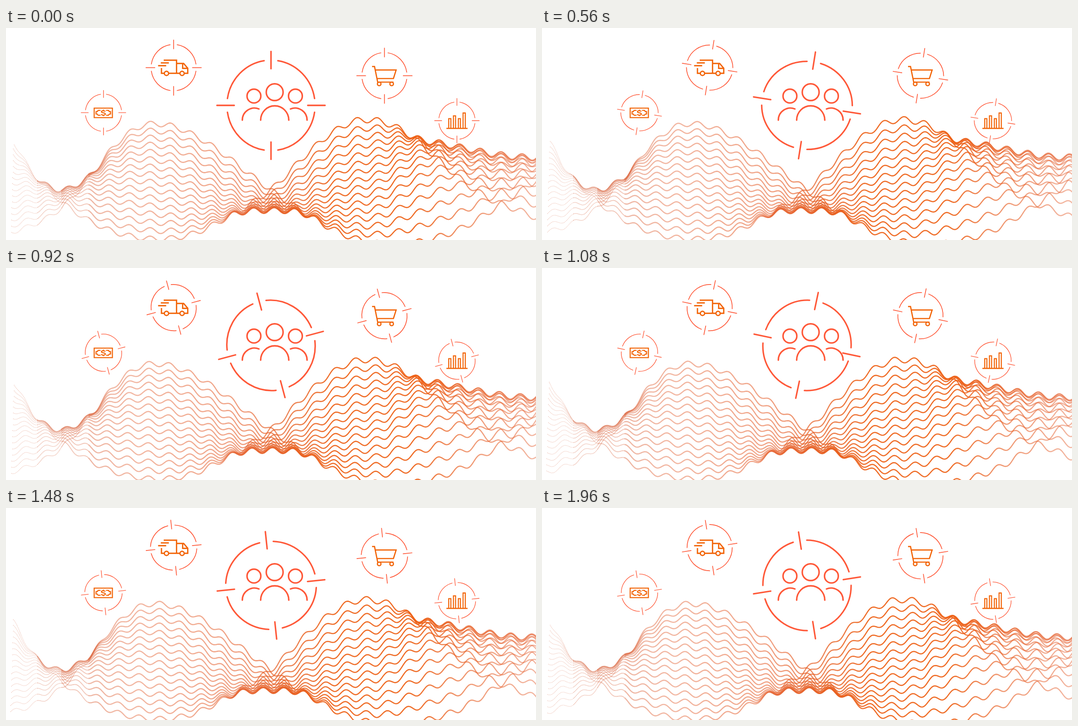
An HTML page with a canvas that plays this animation: 1183 by 474 pixels, repeating every 2000 ms.

```html
<!DOCTYPE html>
<html lang="en">
<head>
<meta charset="utf-8">
<title>Customer waves</title>
<style>
  html, body { margin: 0; width: 100%; height: 100%; overflow: hidden; background: #fff; }
  canvas, svg { position: absolute; left: 0; top: 0; width: 1183px; height: 474px; }
  svg { fill: none; }
  .red { stroke: #ff5838; stroke-linecap: round; }
  .icon { stroke: #f26407; }
</style>
</head>
<body>
<canvas id="waves" width="1183" height="474"></canvas>
<svg viewBox="0 0 1183 474">
  <defs>
    <g id="target">
      <ellipse rx="98.4" ry="101.2" pathLength="360" stroke-dasharray="72.2 17.8" stroke-dashoffset="-8.9"/>
      <path d="M0-120.7V-82M0 82V120.7M-120.7 0H-82M82 0H120.7"/>
    </g>
  </defs>

  <g class="red" stroke-width="3.3">
    <g transform="translate(591.5 173)"><use class="spin" href="#target"/></g>
    <g transform="translate(374.2 88.6) scale(.512)"><use class="spin" href="#target"/></g>
    <g transform="translate(844.7 106.7) scale(.512)"><use class="spin" href="#target"/></g>
    <g transform="translate(217.6 189.4) scale(.413)"><use class="spin" href="#target"/></g>
    <g transform="translate(1006.5 207.2) scale(.413)"><use class="spin" href="#target"/></g>
  </g>

  <!-- people -->
  <g class="red" stroke-width="3.4">
    <circle cx="599.7" cy="143.5" r="18.8"/>
    <circle cx="553.4" cy="152.2" r="15.4"/>
    <circle cx="646" cy="152.2" r="15.4"/>
    <path d="M568.4 206A31.4 32 0 0 1 631.2 206M527.5 206A27 27 0 0 1 564.5 181M635 181A27 27 0 0 1 672 206"/>
  </g>

  <!-- truck -->
  <g class="icon" stroke-width="2.9">
    <path d="M352 72H380.7V101M345.5 78H363.5M339.5 84.2H357.5M347 89.5V101.3H353M363 101.3H388M380.7 79.3H396.5L405.7 90V101.3H398M394.3 79.5V90.3H405.5"/>
    <circle cx="358.2" cy="101.5" r="4.7"/>
    <circle cx="393" cy="101.5" r="4.7"/>
  </g>

  <!-- cart -->
  <g class="icon" stroke-width="2.7">
    <path d="M817 86.2H822.6L829.6 121H865M824.2 93.8H870.8L864.8 113H828"/>
    <circle cx="833" cy="125" r="4"/>
    <circle cx="860.8" cy="125" r="4"/>
  </g>

  <!-- banknote -->
  <g class="icon" stroke-width="2.3">
    <path d="M196.8 179.2H237.5V200.3H196.8Z"/>
    <path d="M211 184.2H205.6L203.8 187H200.9V192.4H203.8L205.6 195.2H211M223.4 184.2H228.8L230.6 187H233.5V192.4H230.6L228.8 195.2H223.4"/>
    <path d="M221.6 186.8C220.5 184.6 213 184.1 213 187.3C213 190.7 221.8 188.7 221.8 192.3C221.8 195.9 213.6 195.2 212.6 192.8M217.2 182.6V185M217.2 194.6V197"/>
  </g>

  <!-- chart -->
  <g class="icon" stroke-width="2.3">
    <path d="M983 224.5H1030.3M988.2 224V202.6H993V224M998.7 224V196.4H1003.5V224M1009.7 224V202.6H1014.3V224M1020.2 224V190H1025.2V224"/>
  </g>
</svg>
<script>
const W = 1183, H = 474, LOOP = 2000, STEP = 60, LINES = 16;
const ctx = document.getElementById('waves').getContext('2d');
const spinners = document.querySelectorAll('.spin');

// The sheet's two edges and its middle line, one value every STEP px.
const edgeA = [235, 325, 385, 427, 455, 469, 471, 459, 431, 397, 354, 293, 240, 208, 210, 239, 290, 342, 382, 406, 428];
const edgeB = [458, 440, 405, 343, 266, 220, 217, 240, 278, 324, 369, 409, 445, 471, 483, 482, 469, 446, 410, 371, 333];
const middle = [352, 354, 362, 347, 337, 334, 342, 360, 383, 402, 408, 395, 375, 352, 332, 297, 275, 273, 280, 288, 294];

function spline(points, x) {
  const i = Math.floor(x / STEP), f = x / STEP - i;
  const at = n => points[Math.max(0, Math.min(points.length - 1, n))];
  const [a, b, c, d] = [at(i - 1), at(i), at(i + 1), at(i + 2)];
  return b + f / 2 * (c - a + f * (2 * a - 5 * b + 4 * c - d + f * (3 * (b - c) + d - a)));
}

// Across the sheet (u from -1 to 1) the height is a parabola through edge, middle, edge.
const shape = Array.from({ length: W + 3 }, (_, x) => {
  const a = spline(edgeA, x), b = spline(edgeB, x), m = spline(middle, x);
  return { m, tilt: (b - a) / 2, bend: (a + b) / 2 - m, ripple: 5.3 + 1.7 * Math.min(1, x / 850) };
});

const ink = ctx.createLinearGradient(0, 0, W, 0);
[[0, '210,100,65,.55'], [.12, '216,100,62,.46'], [.25, '228,104,60,.48'], [.42, '230,98,48,.58'],
 [.52, '230,94,34,.72'], [.62, '238,97,22,.92'], [.77, '238,97,22,.92'], [.86, '232,96,36,.66'],
 [1, '228,98,52,.46']].forEach(([at, c]) => ink.addColorStop(at, `rgba(${c})`));

// The dots grow and join from left to right.
const zones = [
  { to: 70, width: 1.2, dash: [1.2, 1.8] },
  { to: 124, width: 1.5, dash: [1.8, 1.2] },
  { to: 184, width: 1.9, dash: [2.4, .6] },
  { to: W + 1, width: 2.6, dash: [] },
];

function strokeLine(u, t, from, to) {
  ctx.beginPath();
  for (let x = from; x <= to; x += 2) {
    const s = shape[x];
    const y = s.m + s.tilt * u + s.bend * u * u
            - s.ripple * Math.cos(2 * Math.PI * ((x - 322) / 46.1 - t));
    ctx.lineTo(x, y);
  }
  ctx.stroke();
}

function draw(t) {
  ctx.clearRect(0, 0, W, H);
  ctx.strokeStyle = ink;
  ctx.lineJoin = 'round';
  for (let i = 0; i < LINES; i++) {
    const u = 2 * i / (LINES - 1) - 1;
    let from = 2 * Math.round((14 - 3 * u - 2 * Math.sin(2 * Math.PI * t)) / 2);
    for (const { to, width, dash } of zones) {
      ctx.lineWidth = width;
      ctx.setLineDash(dash);
      strokeLine(u, t, from, to);
      from = to;
    }
  }
  spinners.forEach(s => s.setAttribute('transform', `rotate(${180 * t})`));
}

let shown = -1;
function tick() {
  // 25 pictures per second, each taken from a 60 Hz motion.
  const picture = Math.floor(performance.now() % LOOP / 40);
  if (picture !== shown) {
    shown = picture;
    draw(Math.floor(picture * 2.4 + 1e-6) / 60);
  }
  requestAnimationFrame(tick);
}
tick();
</script>
</body>
</html>
```
